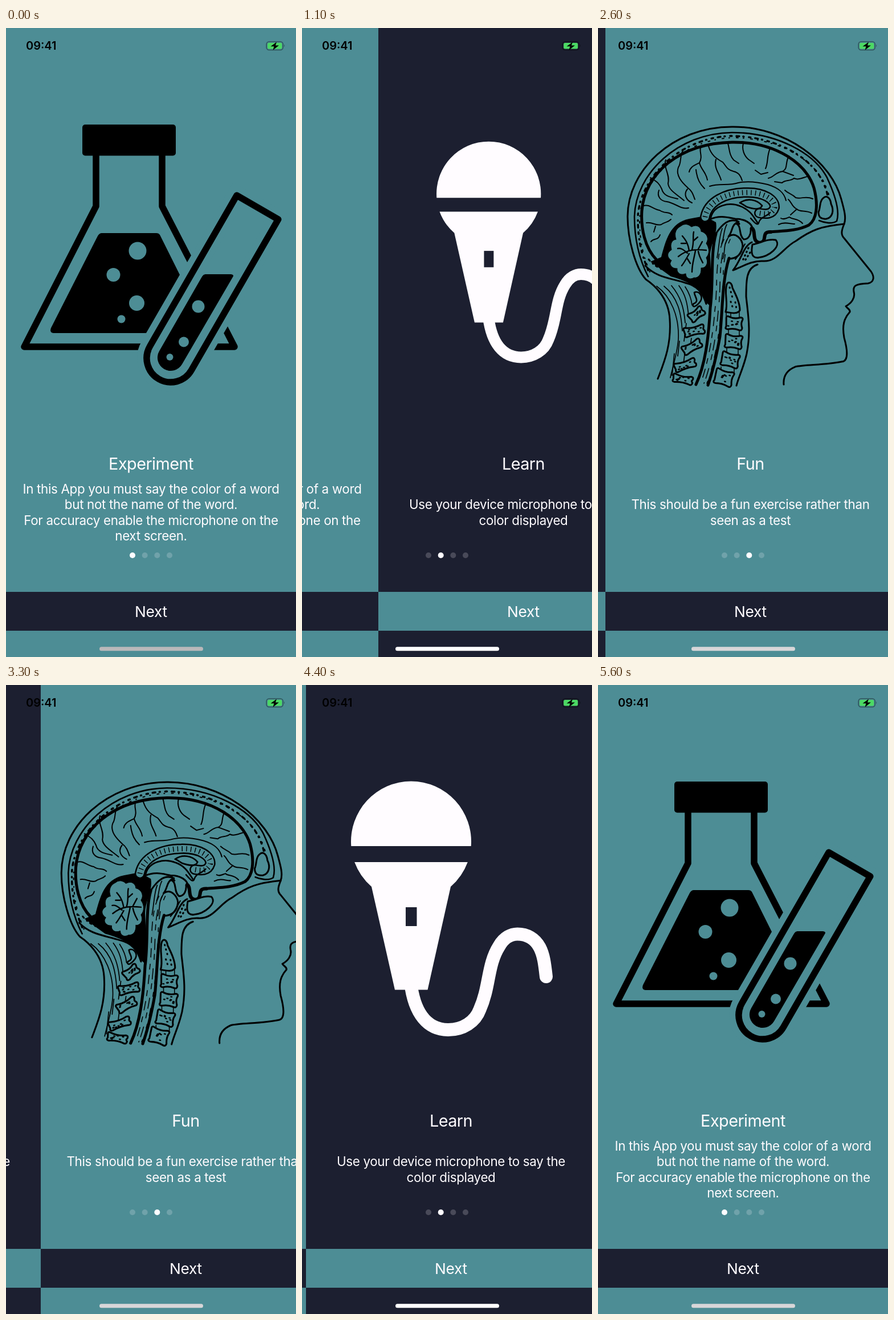
Write an HTML page that moves like this. It is 509 px wide and 1101 px high and loops after 5.7 s.

```html
<!DOCTYPE html>
<html lang="en">
<head>
<meta charset="utf-8">
<title>Onboarding</title>
<style>
html, body { margin: 0; width: 100%; height: 100%; overflow: hidden; background: #4d8d95; }
svg { display: block; width: 100%; height: 100%; }
text { font-family: Inter, Roboto, sans-serif; fill: #fffcff; text-anchor: middle; }
.title { font-size: 28.8px; letter-spacing: -.018em; }
.body { font-size: 22.4px; letter-spacing: -.015em; }
.next { font-size: 26.3px; letter-spacing: -.012em; }
.clock { font-size: 20px; font-weight: 600; fill: #000; text-anchor: start; }
.ink { fill: none; stroke: #000; stroke-linecap: round; stroke-linejoin: round; }
</style>
</head>
<body>
<svg id="stage" viewBox="0 0 509 1101"></svg>
<script>
const W = 509, LOOP = 5700, STEP = 100;
const TEAL = '#4d8d95', DARK = '#1c1f30', WHITE = '#fffcff';

const line = (d, w, extra = '') => `<path class="ink" d="${d}" stroke-width="${w}" ${extra}/>`;
const shape = (d, fill) => `<path d="${d}" fill="${fill}"/>`;
const cell = (d, w) => `<path class="ink" d="${d}" stroke-width="${w}" style="fill:${TEAL}"/>`;
const dot = (x, y, r, fill) => `<circle cx="${x}" cy="${y}" r="${r}" fill="${fill}"/>`;
const rect = (x, y, w, h, fill, rx = 0) =>
  `<rect x="${x}" y="${y}" width="${w}" height="${h}" rx="${rx}" fill="${fill}"/>`;

let seed = 7;
const rand = () => (seed = seed * 16807 % 2147483647) / 2147483647;

function flask() {
  const tube = 'M252.6 557L405 293L477.8 335L325.4 599A42 42 0 0 1 252.6 557Z';
  const bubbles = [[231, 390, 15.5], [188.5, 432, 12], [229.5, 481.5, 13.5], [202.5, 509.5, 7]];
  const tubeBubbles = [[337.5, 487.5, 11], [312, 549.5, 9], [287.5, 576, 6]];
  const draw = list => list.map(b => dot(...b, TEAL)).join('');
  return line('M158 215V312L32 558H401L274 312V215', 11.5) +
    rect(134, 169, 164, 54.5, '#000', 5) +
    shape('M168 359H264Q268 359 270 362L305 432L246 534H83Q76 533 79 525L161 364Q164 359 168 359Z', '#000') +
    draw(bubbles) +
    `<path d="${tube}" fill="${TEAL}" stroke="${TEAL}" stroke-width="33.6"/>` +
    line(tube, 11.5) +
    shape('M269 565.5L343 437Q346 431 350 431H395Q401 432 398 436L309 588.5A23 23 0 0 1 269 565.5Z', '#000') +
    draw(tubeBubbles);
}

function mic() {
  return shape('M79.3 282A105.5 105.5 0 1 1 289.7 282Z', WHITE) +
    shape('M85.2 310H283.8A105.5 105.5 0 0 1 254 353L213.5 533.5H156L115 353A105.5 105.5 0 0 1 85.2 310Z', WHITE) +
    rect(175, 389, 19.5, 33, DARK) +
    line('M183.5 520C190 576 214 603.5 250 603.5C275 603.5 297 590 305 568C323 528 318 490 339 457' +
      'C348 441 361 436 371 436C388 436 402 444 410 459C417 472 419 488 421.5 510.5', 23, `style="stroke:${WHITE}"`);
}

// A rounded bone with a few marrow specks.
function bone(x, y, w, h, turn) {
  const a = w / 2, b = h / 2;
  let out = cell(`M${-a} ${-b + 2}Q${-a} ${-b - 2} ${-a + 5} ${-b}Q0 ${-b + 4} ${a - 4} ${-b}Q${a + 2} ${-b} ${a - 1} ${-b + 6}` +
    `Q${a - 3} 0 ${a} ${b - 4}Q${a} ${b + 2} ${a - 6} ${b}Q0 ${b - 3} ${-a + 4} ${b}Q${-a - 2} ${b} ${-a + 1} ${b - 5}Z`, 3);
  for (let i = 0; i < 8; i++) {
    const px = (rand() - .5) * w * .68, py = (rand() - .5) * h * .55;
    out += `<ellipse cx="${px.toFixed(1)}" cy="${py.toFixed(1)}" rx="2.1" ry="1.3"/>`;
  }
  return `<g transform="translate(${x} ${y}) rotate(${turn})">${out}</g>`;
}

function head() {
  const marrow = 'M88 424C74 390 70 365 70 330C74 260 146 191 235 189C310 190 372 224 394 268C400 280 402 288 403 294';
  const cord = 'M224 370C207 405 214 450 208 495C204 550 192 600 183 622';
  const arch = 'M188 331C193 304 224 288 260 288C292 287 311 301 310 314C306 327 294 326 283 324';
  const folds = [
    'M92 262C101 268 107 270 112 282C115 294 126 296 140 299',
    'M119 231C114 244 127 256 123 272C124 284 138 291 151 302',
    'M150 213C143 222 147 236 141 244C136 258 147 270 158 280C165 285 167 292 170 300',
    'M181 207C176 215 185 224 178 236C181 248 190 253 192 266M178 236C168 241 162 243 160 252',
    'M194 207C199 223 207 228 219 235C226 243 226 248 238 251C248 253 251 261 253 267',
    'M228 202C231 212 230 222 238 231L247 237',
    'M255 202C252 213 257 224 264 230M302 211C296 224 299 236 294 246M264 230L274 237',
    'M335 224C328 236 334 246 324 251C312 252 309 261 299 263M324 251L343 258',
    'M367 260C354 264 350 266 344 263C337 269 329 265 323 271L310 269',
    'M196 277C213 271 229 277 246 271C264 267 282 270 298 274C318 280 327 289 330 302',
    'M377 299C364 293 357 300 347 297C340 290 334 290 328 284',
    'M375 324C363 318 355 323 349 317C340 313 340 305 334 300M349 317L338 327',
    'M359 342C350 332 342 336 336 331C331 333 326 336 321 333M317 344C329 338 339 344 345 343',
    'M80 311C91 308 97 318 108 319C118 326 123 320 130 327',
    'M85 341C96 339 101 347 111 344C118 339 122 341 128 335M101 347L98 357',
    'M93 374C98 367 105 373 109 362',
    'M107 284C103 295 110 303 121 304C137 307 145 318 159 315',
    'M157 282C149 292 156 302 165 306M172 248C174 265 179 273 187 281',
    'M207 230C203 246 213 254 216 266M276 249L286 256L298 253'
  ];
  const muscles = [
    'M103 452C128 470 143 505 141 545C139 570 132 590 127 612',
    'M116 452C141 472 146 500 148 530', 'M129 451C145 470 151 490 153 516',
    'M142 451C153 466 157 480 159 505', 'M153 453C161 465 164 475 165 485',
    'M134 570L130 608M143 548L140 574M155 517L151 548M164 543L160 569M152 572L149 596'
  ];
  const front = [[239, 517, 29, 22, 4], [238, 549, 30, 23, 6], [232, 581, 31, 24, 13], [221, 612, 32, 26, 15]];
  const back = [[173, 501, 28, 17, -38], [169, 530, 36, 16, -13], [165, 558, 35, 16, -29], [153, 590, 38, 15, -19], [149, 615, 35, 14, 10]];
  const shifted = (d, w, dash, x) => line(d, w, `stroke-dasharray="${dash}" transform="translate(${x} 0)"`);

  const art =
    line('M105 614C116 585 129 555 126 510C124 470 96 448 84 440C66 420 52 370 52 330C52 250 130 173 235 173' +
      'C330 172 410 235 427 300C432 318 436 332 432 343C427 355 426 362 432 368L479 426C486 436 484 445 474 447' +
      'C452 448 447 451 449 462C452 473 444 482 435 487C438 492 443 492 442 497C432 508 428 520 432 542' +
      'C437 560 441 583 428 584C400 590 362 589 346 593C329 600 325 612 326 624', 3) +
    line('M88 435C70 400 64 365 64 330C66 255 140 184 235 183C315 183 380 220 402 262C415 290 425 320 419 338C410 344 395 340 388 337', 2.6) +
    line(marrow, 3.4, 'stroke-dasharray="3 8 5 7 1 9"') +
    line(marrow, 2, 'stroke-dasharray="1 12 3 9" transform="translate(3 3)"') +
    line('M103 406C82 385 75 350 77 320C82 255 142 202 235 200C315 199 366 239 379 280C387 310 384 335 370 345C348 356 322 355 302 357', 5) +
    cell('M395 298C402 291 408 299 409 308C415 320 411 332 401 334C391 335 387 331 387 322C391 314 388 304 395 298Z', 3) +
    folds.map(d => line(d, 2)).join('') +
    muscles.map(d => line(d, 1.7)).join('') +
    line('M83 416C101 436 128 438 153 446C174 451 184 463 190 483', 3) +
    line('M89 405C105 425 132 428 154 439', 3, 'stroke-dasharray="3 7 1 6"') +
    shape('M92 409L111 401C119 372 126 341 160 334L187 329L207 340C211 360 197 378 197 400L201 490L188 479C181 455 158 443 128 435Z', '#000') +
    // cerebellum
    cell('M145 347C153 340 161 345 164 348C176 342 181 351 181 356C192 359 195 369 190 377C197 387 195 397 190 402' +
      'C195 413 188 421 181 420C182 434 174 438 169 437C160 442 154 437 154 430C144 434 138 428 139 421C128 421 124 413 129 407' +
      'C120 401 121 393 129 388C126 377 130 371 137 370C133 358 138 350 145 347Z', 1) +
    line('M141 400C157 387 173 387 190 389M160 390C158 376 153 370 148 364M165 388C169 375 166 365 168 357M176 387L183 374' +
      'M157 394C149 387 145 385 140 386M160 395C154 406 151 411 147 416M171 390C168 406 165 414 165 427M176 391C178 401 182 407 184 411M154 377L146 377M167 373L175 366M157 404L162 412', 2.4) +
    // stem and spinal cord
    shape('M207 360C217 345 232 333 248 338C237 352 251 366 254 380C253 394 244 403 229 404C219 438 219 490 214 540C207 580 200 605 193 625H172C188 590 193 540 196 490C203 447 196 405 207 360Z', TEAL) +
    line('M207 360C197 395 203 447 197 490C194 545 188 590 172 624', 5) +
    line('M230 403C218 440 219 490 214 540C207 580 200 605 193 625', 5) +
    line('M207 360C217 345 230 331 247 339C233 344 237 356 229 365C242 356 253 370 254 381C252 398 242 404 229 404', 3) +
    line('M218 351C212 367 213 382 209 402M226 344C220 355 222 365 217 378M229 366C219 380 224 392 219 404', 1.7) +
    [[-3, '15 12 9 10'], [3, '9 16 18 8'], [8, '7 21 13 15']].map(([x, dash]) => shifted(cord, 1.5, dash, x)).join('') +
    // arch and ventricles
    line(arch, 18) + line(arch, 13, `style="stroke:${TEAL}"`) +
    `<path d="${arch}" fill="none" stroke="#000" stroke-width="9" stroke-dasharray="1.4 6.2"/>` +
    line('M198 332C203 310 231 304 250 312C269 319 274 333 281 342M249 306C262 297 279 300 288 311C285 319 272 317 261 313C256 310 254 308 249 306', 2.7) +
    line('M196 335C216 326 232 333 241 334C258 334 270 342 271 351M242 342C253 346 246 363 256 370C265 370 269 360 268 351M248 343L242 335', 3) +
    line('M302 323C297 330 285 330 282 341C280 347 274 340 268 333', 2.5) +
    line('M270 350C278 355 269 374 284 376C299 374 285 356 303 357', 6) +
    // base of the skull
    line('M270 375C255 382 252 405 237 424C255 417 270 407 289 408C315 410 325 384 347 373C375 353 392 347 432 343', 3) +
    cell('M271 379C285 377 298 368 312 371C322 382 301 400 281 402C268 403 269 390 271 379Z', 3) +
    line('M264 385L253 409M267 393L258 407', 3.2, 'stroke-dasharray="1 6"') +
    line('M258 378C253 386 250 395 241 405', 2) +
    line('M280 414C260 420 260 442 260 470C263 500 269 530 261 570C255 596 247 610 243 626', 3) +
    // neck bones
    cell('M226 449C229 442 235 446 236 455C243 469 249 482 249 494C245 502 231 498 224 497C229 481 221 463 226 449Z', 3) +
    line('M231 454L236 472M233 479L237 491M241 480L243 491', 3, 'stroke-dasharray="1 7"') +
    line('M225 497V508M233 499V507M248 497V508M229 527V540M248 528V539M226 560V573M246 561V572M216 593V603M239 594V606', 1.5) +
    cell('M169 463C177 459 185 469 180 478C172 489 165 490 167 483C179 478 170 472 169 463Z', 2.6) +
    front.map(b => bone(...b)).join('') + back.map(b => bone(...b)).join('');
  return `<g transform="translate(254.5 397.5) scale(1.0129) translate(-267.5 -397.5)">${art}</g>`;
}

const pages = [
  { bg: TEAL, bar: DARK, art: flask, title: 'Experiment', top: 814.5, body: [
    'In this App you must say the color of a word', 'but not the name of the word.',
    'For accuracy enable the microphone on the', 'next screen.'] },
  { bg: DARK, bar: TEAL, art: mic, title: 'Learn', top: 842, body: ['Use your device microphone to say the', 'color displayed'] },
  { bg: TEAL, bar: DARK, art: head, title: 'Fun', top: 842, body: ['This should be a fun exercise rather than', 'seen as a test'] }
];

const label = (cls, y, s) => `<text class="${cls}" x="254.5" y="${y}">${s}</text>`;
const pageMarkup = p => `<g class="page">${rect(0, 0, W, 1101, p.bg)}${rect(0, 987, W, 68, p.bar)}
  <g class="art">${p.art()}</g>${label('title', 773, p.title)}
  ${p.body.map((s, i) => label('body', p.top + i * 27.5, s)).join('')}${label('next', 1030.5, 'Next')}</g>`;

const stage = document.getElementById('stage');
stage.innerHTML = pages.map(pageMarkup).join('') +
  [0, 1, 2, 3].map(i => `<circle class="dot" cx="${222 + i * 21.67}" cy="923" r="5" fill="${WHITE}"/>`).join('') +
  `<text class="clock" x="35" y="38.3">09:41</text>
  <rect x="457.2" y="24" width="29" height="14.5" rx="4.5" fill="none" stroke="#000" stroke-opacity=".4" stroke-width="1.6"/>
  <path d="M488 28.5Q490 31 488 33.5Z" fill-opacity=".4"/>` +
  rect(459.2, 26, 25, 10.6, '#4cd964', 2.5) +
  `<path d="M475 24.5L464.5 32.3H470.5L468.5 38.8L479 30.5H473Z"/>
  <rect id="home" x="164" y="1083.3" width="182" height="7" rx="3.5"/>`;

const pageEls = [...stage.querySelectorAll('.page')];
const artEls = [...stage.querySelectorAll('.art')];
const dots = [...stage.querySelectorAll('.dot')];
const home = document.getElementById('home');

// Progress of each swipe, one value per step.
const swipes = [
  { at: 700, from: 0, to: 1, path: [.02, .09, .24, .48, .737, .9, .97, 1] },
  { at: 2100, from: 1, to: 2, path: [.029, .12, .36, .7, .9, .975, .991, .997, 1] },
  { at: 3200, from: 2, to: 1, path: [.02, .12, .35, .65, .868, .955, .987, 1] },
  { at: 4400, from: 1, to: 0, path: [.014, .1, .32, .62, .85, .95, .985, 1] }
];

function scroll(t) {
  const s = swipes.filter(s => s.at <= t).pop();
  if (!s) return { pos: 0, forward: true };
  const k = Math.min(Math.floor((t - s.at) / STEP), s.path.length - 1);
  return { pos: s.from + (s.to - s.from) * s.path[k], forward: s.to > s.from };
}

// Arriving art grows from half size; art leaving forward shrinks away.
function artScale(offset, forward) {
  const f = Math.abs(offset);
  if (forward && offset < 0) return Math.max(0, 1 - 2 * f);
  if (!forward && offset > 0) return 1;
  return Math.max(.5, 1 - f / 2);
}

function draw(time) {
  const t = Math.floor(time % LOOP / STEP) * STEP;
  const { pos, forward } = scroll(t);
  const active = Math.round(pos);
  pageEls.forEach((el, i) => {
    const offset = i - pos, k = artScale(offset, forward);
    el.setAttribute('transform', `translate(${Math.round(offset * W)} 0)`);
    artEls[i].setAttribute('transform', `translate(254.5 397.5) scale(${k}) translate(-254.5 -397.5)`);
  });
  dots.forEach((el, i) => el.setAttribute('fill-opacity', i === active ? 1 : .2));
  const grey = Math.round(186 + 30 * Math.min(1, t / 600));
  home.setAttribute('fill', active === 1 ? '#fff' : `rgb(${grey},${grey - 2},${grey})`);
}

const start = performance.now();
function tick() {
  draw(performance.now() - start);
  requestAnimationFrame(tick);
}
tick();
</script>
</body>
</html>
```
